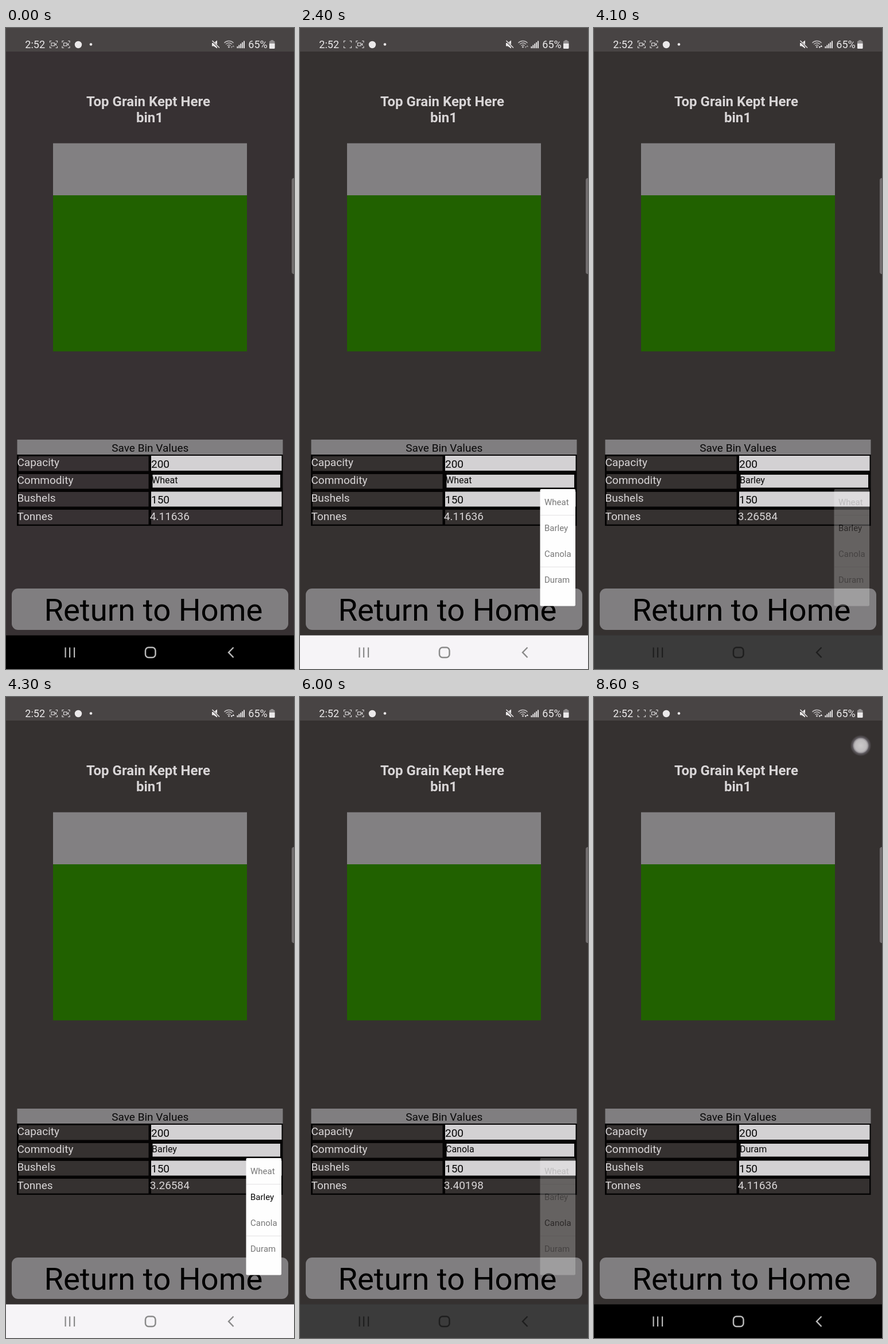
An HTML page with a canvas that plays this animation: 502 px wide and 1115 px high, repeating every 8700 ms.

```html
<!DOCTYPE html>
<html lang="en">
<head>
<meta charset="utf-8">
<title>Bin values</title>
<style>
html, body { margin: 0; width: 100%; height: 100%; overflow: hidden; background: #353130; }
canvas, svg { position: absolute; left: 0; top: 0; width: 502px; height: 1115px; }
text { font-family: Roboto, sans-serif; white-space: pre; }
</style>
</head>
<body>
<canvas id="stage" width="502" height="1115"></canvas>
<svg id="layer" width="502" height="1115" viewBox="0 0 502 1115">
  <defs>
    <radialGradient id="glow">
      <stop offset="0" stop-color="#cbc9ca"/>
      <stop offset=".55" stop-color="#bcb9bb"/>
      <stop offset=".68" stop-color="#aba8ac" stop-opacity=".85"/>
      <stop offset=".76" stop-color="#8d8893" stop-opacity=".5"/>
      <stop offset="1" stop-color="#8d8893" stop-opacity="0"/>
    </radialGradient>
  </defs>
  <g id="labels"></g>
  <g id="menu">
    <rect x="418.5" y="802" width="61.5" height="203.5" rx="2" fill="#fefefe"/>
    <path d="M419 847.5h61M419 937.5h61" stroke="#e3e2e3"/>
  </g>
  <circle id="touch" r="18.5" fill="url(#glow)"/>
</svg>
<script>
const LOOP = 8700, STEP = 100;
const $ = id => document.getElementById(id);
const ctx = $('stage').getContext('2d');
const menu = $('menu'), touch = $('touch');

const tonnes = { Wheat: '4.11636', Barley: '3.26584', Canola: '3.40198', Duram: '4.11636' };
const crops = Object.keys(tonnes);

// Each visit to the drop-down: when it is tapped and when an item is picked
const visits = [
  { open: 100, pick: 2900 },
  { open: 3800, pick: 4800 },
  { open: 5700, pick: 6700 }
];
const IDLE = 185;
const fadeIn = [[200, 0], [300, .24], [400, .95], [500, 1]];
const fadeOut = [[100, 1], [200, .5], [300, .02], [400, 0]];
const iconsIn = [[200, IDLE], [300, 30], [400, 110], [500, 138]];
const iconsOut = [[100, 138], [200, 45], [300, 28], [400, 135], [500, IDLE]];

function ramp(t, keys) {
  if (t <= keys[0][0]) return keys[0][1];
  for (let i = 1; i < keys.length; i++) {
    const [t0, v0] = keys[i - 1], [t1, v1] = keys[i];
    if (t <= t1) return v0 + (v1 - v0) * (t - t0) / (t1 - t0);
  }
  return keys[keys.length - 1][1];
}

function label(str, x, y, size, fill, parent = $('labels'), extra = {}) {
  const el = document.createElementNS('http://www.w3.org/2000/svg', 'text');
  const attrs = { x, y, fill, 'font-size': size, ...extra };
  for (const k in attrs) el.setAttribute(k, attrs[k]);
  el.textContent = str;
  parent.append(el);
  return el;
}

const light = '#d9d6d7';
const mid = { 'text-anchor': 'middle' };
const title = { ...mid, 'font-weight': 700 };
label('2:52', 33.3, 35, 18, '#ebe9ea');
label('65%', 422.3, 35, 18, '#ebe9ea');
label('Top Grain Kept Here', 248, 136, 24, light, undefined, title);
label('bin1', 250.5, 164.3, 24, light, undefined, title);
label('Save Bin Values', 251.3, 736.5, 19, '#080808', undefined, mid);
['Capacity', 'Commodity', 'Bushels', 'Tonnes'].forEach((s, i) =>
  label(s, 19.5, 762 + i * 31.2, 19, light));
label('200', 253, 764.5, 19, '#080808');
label('150', 253, 826.5, 19, '#080808');
const cropText = label('', 254, 792, 16, '#080808');
const tonneText = label('', 250.8, 855.8, 19, light);
label('Return to Home', 66.4, 1031.3, 54.5, '#000');
const items = crops.map((s, i) => label(s, 426, 830.3 + i * 45, 15, '#777', menu));

function box(x, y, w, h, fill, r = 0) {
  ctx.fillStyle = fill;
  ctx.beginPath();
  ctx.roundRect(x, y, w, h, r);
  ctx.fill();
}

function line(points, color, width) {
  ctx.strokeStyle = color;
  ctx.lineWidth = width;
  ctx.beginPath();
  points.forEach(([x, y], i) => i ? ctx.lineTo(x, y) : ctx.moveTo(x, y));
  ctx.stroke();
}

function shape(points, fill) {
  ctx.fillStyle = fill;
  ctx.beginPath();
  points.forEach(([x, y]) => ctx.lineTo(x, y));
  ctx.fill();
}

function disc(x, y, r, fill) {
  ctx.fillStyle = fill;
  ctx.beginPath();
  ctx.arc(x, y, r, 0, Math.PI * 2);
  ctx.fill();
}

function captureIcon(cx, filled) {
  const c = '#d5d3d4', cy = 28.5;
  for (const sx of [-1, 1]) for (const sy of [-1, 1]) {
    const x = cx + sx * 6.5, y = cy + sy * 6;
    line([[x - sx * 3, y], [x, y], [x, y - sy * 3]], c, 1.2);
  }
  if (!filled) return;
  ctx.strokeStyle = c;
  ctx.lineWidth = 1.2;
  ctx.strokeRect(cx - 4, cy - 2.5, 5.5, 5);
  shape([[cx + 2, cy], [cx + 4.8, cy - 2.7], [cx + 4.8, cy + 2.7]], c);
}

function statusBar(t) {
  const white = '#ebe9ea', soft = '#c2bfc0', dim = '#918e8f';
  box(0, 0, 502, 41, '#484444');
  captureIcon(83, Math.floor((t + 100) / 500) % 2 === 0);
  captureIcon(104.5, true);
  disc(126, 29, 6.2, white);
  disc(148, 28.5, 2.3, white);

  shape([[359, 26], [362, 26], [368, 21.5], [368, 35.5], [362, 31.5], [359, 31.5]], white);
  line([[358.5, 21.5], [372.5, 35.5]], '#484444', 3);
  line([[359.5, 22], [372, 34.5]], white, 1.4);

  ctx.strokeStyle = soft;
  ctx.lineWidth = 1.3;
  for (const r of [4, 7.5, 11]) {
    ctx.beginPath();
    ctx.arc(388.5, 33.5, r, -Math.PI * .76, -Math.PI * .24);
    ctx.stroke();
  }
  disc(388.5, 33, 1.6, soft);
  const arrow = t >= 3800 ? white : dim;
  shape([[391.5, 32], [395, 32], [393.2, 35.5]], arrow);
  shape([[394.5, 33], [398, 33], [396.2, 29.5]], arrow);

  for (let i = 0; i < 5; i++) box(402.5 + i * 2.9, 32 - i * 2.4, 1.9, 3.2 + i * 2.4, white);
  box(461.5, 21, 4.5, 2.5, dim, .5);
  box(459, 22.5, 9.5, 13.5, dim, 1.5);
  box(459, 27, 9.5, 9, white, [0, 0, 1.5, 1.5]);
}

function table(bg) {
  const field = '#d3d1d3';
  box(19.5, 716, 463, 26, '#807e80');
  box(19, 742, 463.5, 124, '#050404');
  for (let i = 0; i < 4; i++) box(22, 745 + i * 31, 226.5, 25.5, bg);
  box(253, 744, 227.5, 26, field);
  box(255.5, 777, 222.5, 22.5, field);
  box(253, 806.5, 227.5, 26, field);
  box(253, 838, 227, 25.5, bg);
}

function navBar(open, grey) {
  const mix = c => Math.round(c * open);
  box(0, 1056.5, 502, 58.5, `rgb(${mix(246)},${mix(244)},${mix(247)})`);
  const c = `rgb(${grey},${grey},${grey})`;
  for (const x of [102.5, 110, 118]) box(x, 1077.5, 2.2, 17.5, c);
  ctx.strokeStyle = c;
  ctx.lineWidth = 2.5;
  ctx.beginPath();
  ctx.roundRect(243, 1077.5, 17.5, 17.5, 5.5);
  ctx.stroke();
  line([[396.5, 1077.5], [388, 1086.2], [396.5, 1095]], c, 2.4);
}

function touchAt(t) {
  if (t >= 8500) return [465, 84.5];
  for (let i = 0; i < visits.length; i++) {
    const { open, pick } = visits[i];
    if (t >= open && t < open + 200) return [452, 788];
    if (t >= pick && t < pick + 100) return [448, 870 + i * 45];
  }
  return null;
}

function draw(t) {
  let open = 0, grey = IDLE, crop = 0, chosen = 0;
  visits.forEach((v, i) => {
    if (t < v.open) return;
    const closing = t >= v.pick, dt = t - (closing ? v.pick : v.open);
    open = ramp(dt, closing ? fadeOut : fadeIn);
    grey = Math.round(ramp(dt, closing ? iconsOut : iconsIn));
    chosen = i;
    crop = closing && dt >= 200 ? i + 1 : i;
  });

  const bg = t < 100 ? '#373133' : '#353130';
  box(0, 0, 502, 1115, bg);
  statusBar(t);
  box(82, 200.5, 338, 91, '#828082');
  box(82, 291, 338, 271.5, '#216100');
  box(498, 261, 8, 167, '#716d6e', 4);
  table(bg);
  box(10, 975, 482, 72, '#807e80', 11);
  navBar(open, grey);

  cropText.textContent = crops[crop];
  tonneText.textContent = tonnes[crops[crop]];
  menu.setAttribute('opacity', open);
  items.forEach((el, i) => el.setAttribute('fill', i && i === chosen ? '#080808' : '#777'));

  const spot = touchAt(t);
  touch.setAttribute('opacity', spot ? 1 : 0);
  if (spot) {
    touch.setAttribute('cx', spot[0]);
    touch.setAttribute('cy', spot[1]);
  }
}

const start = performance.now();
function tick() {
  const t = (performance.now() - start) % LOOP;
  draw(Math.floor(t / STEP) * STEP);
  requestAnimationFrame(tick);
}
tick();
</script>
</body>
</html>
```
